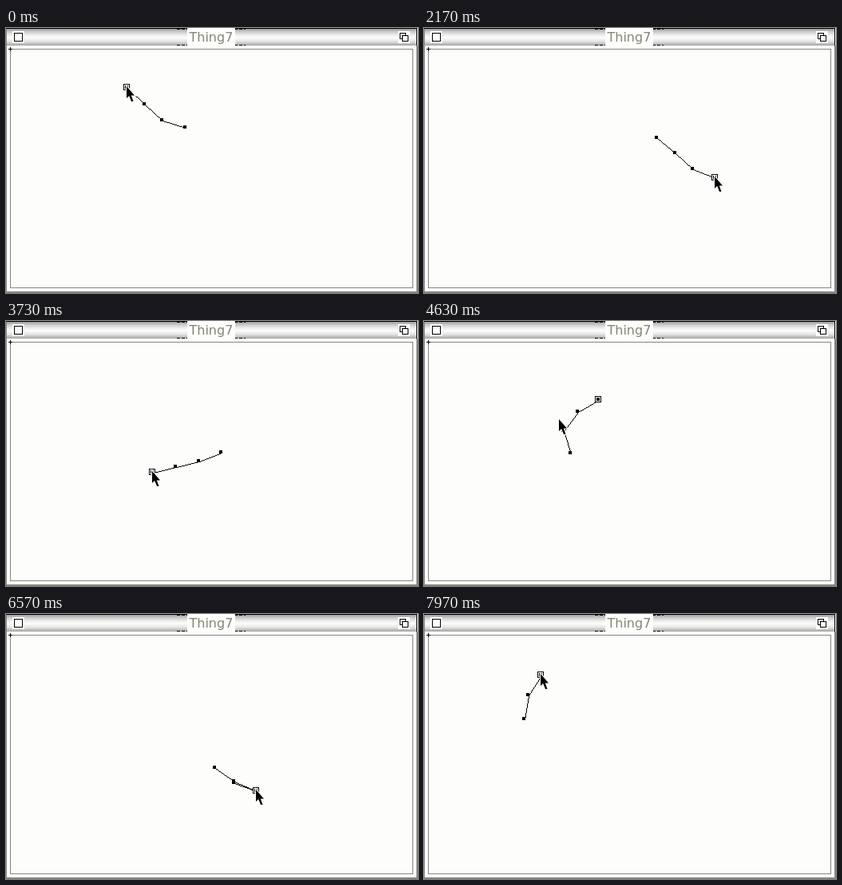
Animation, 516 px wide and 332 px high, one loop 8000 ms. Source, as an HTML page with a canvas:

```html
<!DOCTYPE html>
<html lang="en">
<head>
<meta charset="utf-8">
<title>Thing7</title>
<style>
html, body { margin: 0; width: 100%; height: 100%; overflow: hidden; background: #fdfdfb; }
.window { position: relative; width: 516px; height: 332px; overflow: hidden; }
svg, canvas { position: absolute; left: 0; top: 0; }
text { font: 16px "DejaVu Sans", sans-serif; fill: #848476; }
.edge { fill: none; stroke: #86867e; }
</style>
</head>
<body>
<div class="window">
  <svg width="516" height="332" shape-rendering="crispEdges">
    <defs>
      <linearGradient id="bar" x1="0" y1="0" x2="0" y2="1">
        <stop offset="0" stop-color="#8c8c8c"/>
        <stop offset=".2" stop-color="#c8c8ca"/>
        <stop offset=".4" stop-color="#eeeeee"/>
        <stop offset=".55" stop-color="#fdfdfb"/>
        <stop offset=".75" stop-color="#e6e6e6"/>
        <stop offset="1" stop-color="#a4a4a4"/>
      </linearGradient>
    </defs>
    <rect width="516" height="332" fill="#fdfdfb"/>
    <rect width="515" height="22" fill="url(#bar)"/>
    <path class="edge" d="M.5 0V331"/>
    <path class="edge" d="M0 331H515V22" stroke-width="2"/>
    <path d="M0 .5H515M514.5 0V22" stroke="#000"/>
    <path d="M214 1.5H300M214 21.5H300" stroke="#000" stroke-dasharray="4 2"/>
    <rect x="227" width="60" height="23" fill="#fdfdfb"/>
    <rect class="edge" x="5.5" y="26.5" width="504" height="299"/>
    <path d="M3 26.5H8M5.5 24V29" stroke="#000"/>
    <g fill="#fff" stroke="#000">
      <rect x="8" y="4" width="15" height="15" stroke="none"/>
      <rect x="10.5" y="6.5" width="10" height="10"/>
      <rect x="491" y="4" width="15" height="15" stroke="none"/>
      <rect x="493.5" y="6.5" width="7" height="7"/>
      <rect x="496.5" y="9.5" width="7" height="7"/>
    </g>
    <text x="229.5" y="17">Thing7</text>
  </svg>
  <canvas id="stage" width="516" height="332"></canvas>
</div>
<script>
const LOOP = 8000, STEPS = 240, LINK = 30;
const RELEASE = 4320, REGRAB = 5100;
const ctx = document.getElementById('stage').getContext('2d');

// Pointer stops: x, y, arrival and, where it rests, departure
const stops = [
  [151, 74, 0, 900], [190, 78, 1280], [253, 64, 1630], [348, 191, 2110],
  [440, 108, 2470, 2880], [280, 164, 3370], [183, 189, 3690, 3770],
  [108, 152, 4050], [218, 98, 4300, 4330], [164, 127, 4700, 5880],
  [245, 188, 6350], [313, 221, 6570], [395, 190, 6720], [350, 110, 7050],
  [208, 203, 7500], [92, 155, 7750], [146, 76, 7970]
].map(([x, y, arrive, leave = arrive]) => ({ at: [x, y], arrive, leave }));

const stepTime = k => Math.round(k * 10 / 3) * 10;
const heldAt = t => t < RELEASE ? 0 : t < REGRAB ? -1 : 2;

function slope(i, axis) {
  const a = stops[i - 1], b = stops[i], c = stops[i + 1];
  if (!a || !c || b.leave > b.arrive) return 0;
  return (c.at[axis] - a.at[axis]) / (c.arrive - a.leave);
}

// Smooth curve through the stops
function pointer(t) {
  const i = Math.max(1, stops.findIndex(s => s.arrive > t));
  const a = stops[t >= LOOP - 30 ? stops.length - 2 : i - 1];
  const n = stops.indexOf(a), b = stops[n + 1], d = b.arrive - a.leave;
  const u = Math.min(1, Math.max(0, (t - a.leave) / d)), v = 1 - u;
  return [0, 1].map(axis =>
    v * v * (1 + 2 * u) * a.at[axis] + u * u * (3 - 2 * u) * b.at[axis] +
    u * v * d * (v * slope(n, axis) - u * slope(n + 1, axis)));
}

// Keep each joint one link away from its neighbour on the held side
function follow(joints, held) {
  const pull = (i, from) => {
    const [x, y] = joints[from];
    const dx = joints[i][0] - x, dy = joints[i][1] - y;
    const s = LINK / (Math.hypot(dx, dy) || 1);
    joints[i] = [x + dx * s, y + dy * s];
  };
  for (let i = held + 1; i < 4; i++) pull(i, i - 1);
  for (let i = held - 1; i >= 0; i--) pull(i, i + 1);
}

// Drag the chain along the pointer's whole route once
function buildSteps() {
  const joints = [[151, 74], [173, 95], [195, 115], [224, 124]];
  return Array.from({ length: STEPS }, (_, k) => {
    const t = stepTime(k), held = heldAt(t);
    if (held >= 0) {
      const [x, y] = pointer(t), [hx, hy] = joints[held];
      if (Math.hypot(x - hx, y - hy) > 0.01) {
        joints[held] = [x, y];
        follow(joints, held);
      }
    }
    return joints.map(p => p.map(Math.round));
  });
}

function pixelLine([x0, y0], [x1, y1]) {
  const n = Math.max(Math.abs(x1 - x0), Math.abs(y1 - y0), 1);
  for (let i = 0; i <= n; i++) {
    ctx.fillRect(Math.round(x0 + (x1 - x0) * i / n), Math.round(y0 + (y1 - y0) * i / n), 1, 1);
  }
}

function square([x, y], size, color) {
  ctx.fillStyle = color;
  ctx.fillRect(x - size / 2, y - size / 2, size, size);
}

const arrow = new Path2D('M0 0V15L3.2 12L6 19H8.5L5.8 11.5H10Z');

function drawPointer(t) {
  const [x, y] = pointer(t).map(Math.round);
  ctx.save();
  ctx.translate(x, y - 1);
  ctx.strokeStyle = '#fff';
  ctx.lineWidth = 2;
  ctx.stroke(arrow);
  ctx.fillStyle = '#000';
  ctx.fill(arrow);
  ctx.restore();
}

const steps = buildSteps();

function draw(k) {
  const t = stepTime(k), joints = steps[k];
  const marked = joints[t < REGRAB ? 0 : 2];
  ctx.clearRect(0, 0, 516, 332);
  ctx.fillStyle = '#000';
  // Lines hang one pixel right of and below the joint centres
  const ends = joints.map(p => p.map(c => c + 1));
  for (let i = 0; i < 3; i++) pixelLine(ends[i], ends[i + 1]);
  square(marked, 8, '#000');
  square(marked, 6, '#fff');
  joints.forEach(p => square(p, 4, '#000'));
  drawPointer(t);
}

const began = performance.now();
function tick() {
  const t = (performance.now() - began) % LOOP;
  draw(Math.min(STEPS - 1, Math.floor((t + 3.4) * STEPS / LOOP)));
  requestAnimationFrame(tick);
}
tick();
</script>
</body>
</html>
```
